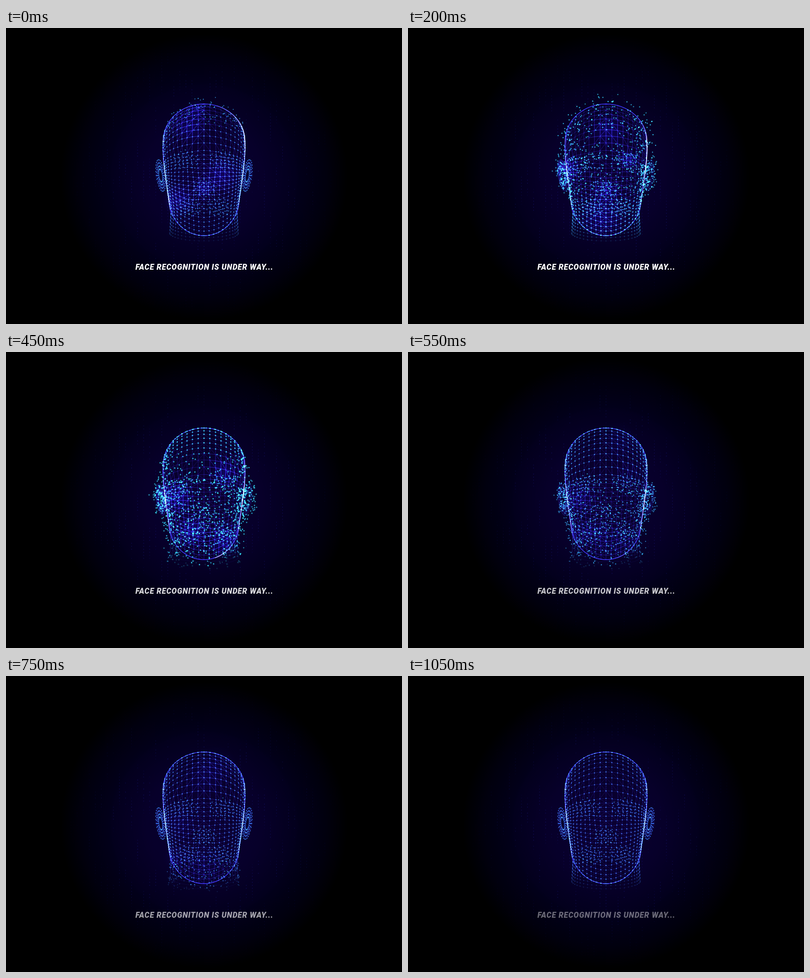
An HTML page with a canvas that plays this animation: 800 by 600 pixels, repeating every 1.1 s.

```html
<!DOCTYPE html>
<html lang="en">
<head>
<meta charset="utf-8">
<title>Face recognition</title>
<style>
  html, body { margin: 0; width: 100%; height: 100%; overflow: hidden; background: #000; }
  canvas, svg { position: absolute; left: 0; top: 0; width: 800px; height: 600px; }
  text { font: italic 900 15.5px Roboto, "Open Sans", sans-serif; letter-spacing: .75px; fill: #fff; }
</style>
</head>
<body>
<canvas id="stage" width="800" height="600"></canvas>
<svg viewBox="0 0 800 600"><text id="label" x="400.8" y="489.5" text-anchor="middle">FACE RECOGNITION IS UNDER WAY...</text></svg>
<script>
const ctx = document.getElementById('stage').getContext('2d');
const label = document.getElementById('label');
const LOOP = 1100, STEP = 50, CX = 400, ROWS = 29, COLS = 11;
const DOME = 75, TEMPLE_Y = 230, JAW_Y = 345;

let seed = 7;
function rand() {
  seed = (seed * 1664525 + 1013904223) % 4294967296;
  return seed / 4294967296;
}
const clamp = v => Math.max(0, Math.min(1, v));
const bell = (d, s) => Math.exp(-(d * d) / (s * s));
const arc = s => 1 - Math.sqrt(Math.max(0, 1 - s * s));
const round = (k, n) => Math.sin(k / n * Math.PI / 2);

// half width of the head by height
const SIDE = [[228, 82.5], [245, 83], [268, 82], [300, 78], [330, 74], [345, 71]];
function halfWidth(y) {
  let i = 1;
  while (i < SIDE.length - 1 && SIDE[i][0] < y) i++;
  const [y0, w0] = SIDE[i - 1], [y1, w1] = SIDE[i];
  return w0 + (w1 - w0) * clamp((y - y0) / (y1 - y0));
}

// latitude line: sags over the skull, rises along the jaw
function onRow(i, s) {
  const mid = i < 9 ? 154 + 5.2 * i + 0.58 * i * i : 248 + 9.1 * (i - 9);
  const sag = DOME * (1 - 2 * i / (ROWS - 1));
  return { x: CX + s * halfWidth(mid + sag), y: mid + sag * arc(s) };
}

// features that draw the mesh together: eyes, nose, mouth corners
const PULL = [[362, 268, 22], [438, 268, 22], [400, 325, 19], [371, 363, 20], [429, 363, 20]];
function warp(p) {
  for (const [x, y, r] of PULL) {
    const k = 0.3 * bell(Math.hypot(p.x - x, p.y - y), r);
    p.x += (x - p.x) * k;
    p.y += (y - p.y) * k;
  }
  return p;
}

const dots = [], lines = [];
function addDot(p, a = 1) {
  const ang = rand() * Math.PI * 2, len = Math.sqrt(rand());
  const d = { x: p.x, y: p.y, a, dx: Math.cos(ang) * len, dy: Math.sin(ang) * len, lag: rand() * 40 - 30 };
  dots.push(d);
  return d;
}
function link(p, q, a = 1) {
  lines.push({ p, q, a, x: (p.x + q.x) / 2, y: (p.y + q.y) / 2 });
}

function buildFace() {
  let prev = null;
  for (let i = 0; i < ROWS; i++) {
    const row = [];
    for (let j = -COLS; j <= COLS; j++) row.push(addDot(warp(onRow(i, round(j, COLS))), j ? 0.85 : 1));
    row.forEach((d, k) => {
      if (k) link(row[k - 1], d);
      if (!prev) return;
      link(prev[k], d);
      const n = k + (k < COLS ? 1 : -1);
      if ((i + k) % 2) link(prev[n], d, 0.8);
    });
    prev = row;
  }
  for (const [x, y, r] of PULL) {
    for (let k = 0; k < 38; k++) {
      const a = k * 2.4, q = r * 1.2 * Math.sqrt((k + 1) / 38);
      addDot({ x: x + Math.cos(a) * q * 1.1, y: y + Math.sin(a) * q * 0.8 }, 0.75);
    }
  }
}

function earPoint(side, a, k) {
  const y = 299 + Math.sin(a) * 32 * k;
  return { x: CX + side * (87.5 - (y - 299) * 0.13 + Math.cos(a) * 9 * k), y };
}
function buildEars() {
  const n = 26;
  for (const side of [-1, 1]) {
    let prev = null;
    for (const k of [1, 0.8, 0.6, 0.4]) {
      const ring = [];
      for (let j = 0; j < n; j++) ring.push(addDot(earPoint(side, j / n * Math.PI * 2, k), 0.7));
      ring.forEach((d, j) => {
        link(d, ring[(j + 1) % n], 0.8);
        if (prev) link(d, prev[j], 0.8);
      });
      prev = ring;
    }
  }
}

function buildNeck() {
  const jaw = halfWidth(JAW_Y);
  for (let i = 0; i < 7; i++) {
    let last = null;
    for (let j = -COLS; j <= COLS; j++) {
      const s = round(j, COLS);
      const p = { x: CX + s * (67 + i * 0.4), y: 392 + i * 6.6 - 16 * arc(s) };
      if (p.y < onRow(ROWS - 1, Math.abs(p.x - CX) / jaw).y + 2) { last = null; continue; }
      const d = addDot(p, 0.6 * clamp((445 - p.y) / 55));
      if (last) link(last, d, d.a);
      last = d;
    }
  }
}

function outlinePoints() {
  const pts = [], N = 30;
  for (let k = -N; k <= N; k++) pts.push(onRow(0, round(k, N)));
  for (let y = TEMPLE_Y; y < JAW_Y; y += 5) pts.push({ x: CX + halfWidth(y), y });
  for (let k = N; k >= -N; k--) pts.push(onRow(ROWS - 1, round(k, N)));
  for (let y = JAW_Y - 5; y >= TEMPLE_Y; y -= 5) pts.push({ x: CX - halfWidth(y), y });
  return pts;
}

// columns of faint background specks
const specks = [];
function buildSpecks() {
  for (let c = -22; c <= 22; c++) {
    const phase = rand() * 6.28, freq = 0.022 + rand() * 0.025;
    for (let y = 40; y < 570; y += 6.1) {
      const x = CX + c * 12.2, r = Math.hypot(x - CX, y - 302);
      if (r < 275 && rand() > 0.3) specks.push({ x, y, phase, freq, a: clamp((285 - r) / 130) });
    }
  }
}

// mesh areas that light up: time, x, y, radius
const SPOTS = [
  [0, 370, 200, 36], [0, 434, 298, 38], [0, 350, 348, 34], [0, 400, 325, 24], [0, 385, 166, 22],
  [200, 405, 206, 36], [200, 445, 266, 22], [200, 400, 332, 32], [200, 392, 385, 46], [200, 322, 285, 28],
  [350, 430, 232, 28], [350, 342, 288, 32], [350, 316, 300, 24], [350, 378, 360, 42], [350, 440, 370, 38],
  [450, 445, 246, 30], [450, 347, 296, 34], [450, 375, 365, 34], [450, 440, 385, 32],
  [650, 425, 182, 42], [650, 350, 300, 36], [650, 400, 385, 46], [650, 345, 368, 28],
  [850, 400, 205, 44]
];

buildFace();
buildEars();
buildNeck();
const outline = outlinePoints();
outline.forEach((p, i) => {
  if (i % 2) addDot({ x: CX + (p.x - CX) * (0.95 + 0.05 * rand()), y: p.y }, 0.7);
});
buildSpecks();

// scatter wave sweeps down, then the dots settle in the same order
function scatter(d, t) {
  const start = (d.y - 200) / 0.75 + d.lag;
  const end = 455 + (d.y - 200) / 0.55;
  const rise = 1 - (1 - clamp((t - start) / 190)) ** 2;
  const fall = 1 - clamp((t - end + 270) / 270) ** 2.4;
  return rise * fall * (15 + 11 * clamp((300 - d.y) / 140));
}

function drawBackground(t) {
  ctx.globalCompositeOperation = 'source-over';
  ctx.fillStyle = '#000';
  ctx.fillRect(0, 0, 800, 600);
  const g = ctx.createRadialGradient(CX, 302, 0, CX, 302, 290);
  [[0, '#0a0032'], [0.4, '#07002a'], [0.64, '#03001d'], [0.66, '#02001a'], [0.85, '#01000e'], [1, '#000']]
    .forEach(([p, c]) => g.addColorStop(p, c));
  ctx.fillStyle = g;
  ctx.fillRect(100, 0, 600, 600);
  ctx.fillStyle = '#2420a0';
  for (const s of specks) {
    const v = Math.sin(s.y * s.freq + s.phase - t / LOOP * Math.PI * 2);
    if (v < 0.25) continue;
    ctx.globalAlpha = v * s.a * 0.5;
    ctx.fillRect(s.x - 0.6, s.y - 0.6, 1.3, 1.3);
  }
  ctx.globalAlpha = 1;
}

function segment(p, q) {
  ctx.beginPath();
  ctx.moveTo(p.x, p.y);
  ctx.lineTo(q.x, q.y);
  ctx.stroke();
}

function drawMesh(t) {
  const lit = SPOTS.map(([at, x, y, r]) => ({ x, y, r, k: bell(t - at, 95) })).filter(s => s.k > 0.02);
  ctx.globalCompositeOperation = 'lighter';
  for (const s of lit) {
    const g = ctx.createRadialGradient(s.x, s.y, 0, s.x, s.y, s.r);
    g.addColorStop(0, `rgba(30,20,220,${0.2 * s.k})`);
    g.addColorStop(1, 'rgba(30,20,220,0)');
    ctx.fillStyle = g;
    ctx.fillRect(s.x - s.r, s.y - s.r, 2 * s.r, 2 * s.r);
  }
  ctx.strokeStyle = '#403cff';
  ctx.lineWidth = 0.9;
  for (const l of lines) {
    let v = 0.23;
    for (const s of lit) v += 0.5 * s.k * bell(Math.hypot(l.x - s.x, l.y - s.y), s.r);
    ctx.globalAlpha = Math.min(0.75, v) * l.a;
    segment(l.p, l.q);
  }
  ctx.globalAlpha = 1;
}

function drawRim(t) {
  const glowY = 215 + 0.16 * t, glow = clamp((720 - t) / 400);
  outline.forEach((p, i) => {
    const q = outline[(i + 1) % outline.length];
    ctx.lineWidth = 1.3;
    ctx.strokeStyle = 'rgba(64,66,255,.75)';
    segment(p, q);
    let w = 0.5 * bell(p.y - 292, 28);
    if (p.x > CX + 25) w += 0.9 * glow * bell(p.y - glowY, 42) + 0.6 * bell(t - 450, 80) * bell(p.y - 412, 14);
    if (w < 0.03) return;
    ctx.lineWidth = 1.6;
    ctx.strokeStyle = `rgba(190,205,255,${Math.min(1, w)})`;
    segment(p, q);
  });
  for (const side of [-1, 1]) {
    const g = ctx.createLinearGradient(0, 365, 0, 420);
    g.addColorStop(0, 'rgba(70,80,230,.55)');
    g.addColorStop(1, 'rgba(70,80,230,0)');
    ctx.strokeStyle = g;
    ctx.lineWidth = 1;
    segment({ x: CX + side * 72, y: JAW_Y }, { x: CX + side * 67, y: 378 });
    for (let k = 0; k < 4; k++) {
      segment({ x: CX + side * (67 - k * 5), y: 376 + k * 8 }, { x: CX + side * (69 - k * 5), y: 420 });
    }
  }
}

function drawDots(t) {
  const act = bell(t - 360, 190), hot = clamp(0.35 * (1 - t / 1000) + act);
  const rgb = [60 - 14 * hot, 170 + 58 * hot, 255 - 38 * hot].map(Math.round);
  ctx.fillStyle = `rgb(${rgb})`;
  const r = 0.98 + 0.42 * act;
  for (const d of dots) {
    const k = scatter(d, t);
    ctx.globalAlpha = d.a * 0.95;
    ctx.beginPath();
    ctx.arc(d.x + d.dx * k, d.y + d.dy * k, r, 0, 7);
    ctx.fill();
  }
  ctx.globalAlpha = 1;
}

function draw(t) {
  drawBackground(t);
  drawMesh(t);
  drawRim(t);
  drawDots(t);
  label.style.opacity = 1 - Math.max(0, t - 250) * 0.00073;
}

let shown = -1;
const begin = performance.now();
function tick() {
  const t = Math.floor(((performance.now() - begin) % LOOP) / STEP) * STEP;
  if (t !== shown) draw(shown = t);
  requestAnimationFrame(tick);
}
tick();
</script>
</body>
</html>
```
